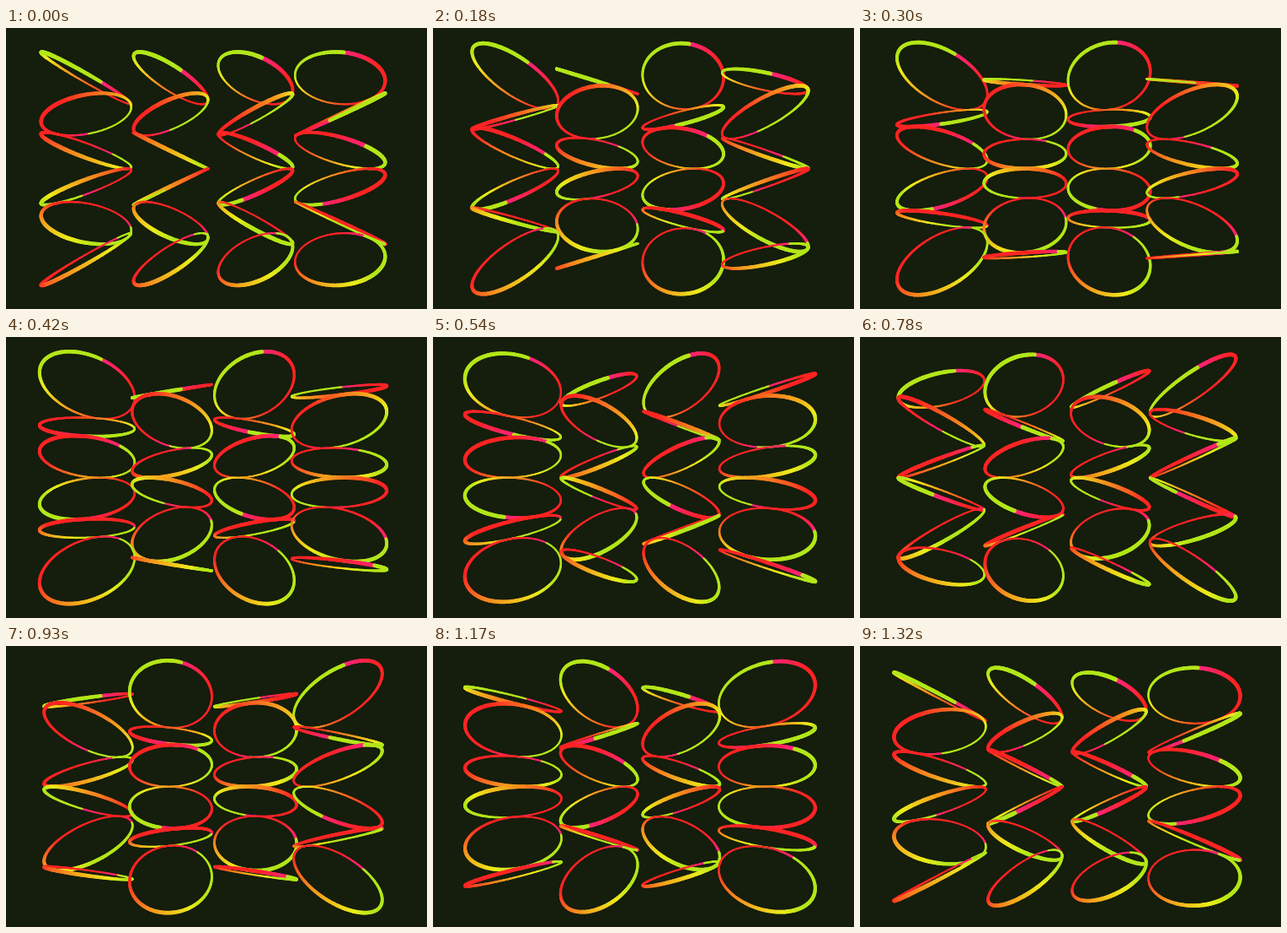
Write an HTML page with a canvas that moves like this. It is 500x333 px and loops after 1.35 s.

```html
<!DOCTYPE html>
<html lang="en">
<head>
<meta charset="utf-8">
<title>Tumbling rings</title>
<style>
html, body { margin: 0; width: 100%; height: 100%; overflow: hidden; background: #151d0c; }
canvas { display: block; width: 500px; height: 333px; }
</style>
</head>
<body>
<canvas id="stage"></canvas>
<script>
const LOOP = 1350, STEP = 30, TAU = Math.PI * 2, DEG = Math.PI / 180;
const COLS = 4, ROWS = 6, PARTS = 120;
const CX = 246, CY = 166.7, HALF_X = 48, HALF_Y = 20.5;

// Screen angle, clockwise in degrees, around which each row glows green.
const GLOW = [205, 20, 20, 180, 75, 30];
const GLOW_REACH = 75;

const canvas = document.getElementById('stage');
const ctx = canvas.getContext('2d');
const ratio = window.devicePixelRatio || 1;
canvas.width = 500 * ratio;
canvas.height = 333 * ratio;

const clamp = v => Math.max(0, Math.min(1, v));

// Magenta at the seam, a long red run, then orange and yellow up to green.
function colour(f) {
  const green = clamp((f - 0.4) / 0.36);
  const pink = clamp(1 - f / 0.12);
  const hue = 75 * green - 25 * pink;
  return `hsl(${(hue + 360) % 360}, ${100 - 20 * green}%, ${57 - 7 * green}%)`;
}

const palette = Array.from({ length: PARTS }, (_, i) => colour((i + 0.5) / PARTS));

function ring(col, row, turn) {
  const x0 = (2 * col - COLS + 1) * HALF_X;
  const y0 = (2 * row - ROWS + 1) * HALF_Y;
  const near = col % 2 ? -1 : 1;
  const high = HALF_Y * (row % 2 ? -1 : 1);

  // The flat part of the orbit wobbles twice per loop.
  const c2 = Math.cos(2 * turn), s2 = Math.sin(2 * turn);
  const wide = 44.5 - 2.5 * c2, skew = 5.5 * s2;
  const depth = near * (0.195 + 0.017 * c2);

  function point(a) {
    const s = 1 / (1 - depth * Math.cos(a));
    return {
      x: CX + s * (x0 - wide * Math.sin(a) + skew * Math.cos(a)),
      y: CY + s * (y0 - high * Math.sin(a + turn)),
      s
    };
  }

  // Phases of the swing on screen tell which way the ring runs round.
  const px = Math.atan2(wide, x0 * depth + skew);
  const py = Math.atan2(high * Math.cos(turn), y0 * depth - high * Math.sin(turn));
  const way = Math.sin(py - px) > 0 ? -1 : 1;
  const side = row < 2 ? 1 : -1;
  const first = way * (GLOW[row] + side * GLOW_REACH) * DEG - px;

  let p = point(first);
  palette.forEach((paint, i) => {
    const q = point(first + way * side * TAU * (i + 1) / PARTS);
    ctx.strokeStyle = paint;
    ctx.lineWidth = 3 * Math.pow(q.s, 2.2);
    ctx.beginPath();
    ctx.moveTo(p.x, p.y);
    ctx.lineTo(q.x, q.y);
    ctx.stroke();
    p = q;
  });
}

function draw(t) {
  ctx.setTransform(ratio, 0, 0, ratio, 0, 0);
  ctx.fillStyle = '#151d0c';
  ctx.fillRect(0, 0, 500, 333);
  ctx.lineCap = 'round';
  for (let row = 0; row < ROWS; row++)
    for (let col = 0; col < COLS; col++) ring(col, row, TAU * t / LOOP);
}

const start = performance.now();
function tick() {
  const t = (performance.now() - start) % LOOP;
  draw(Math.floor(t / STEP) * STEP);
  requestAnimationFrame(tick);
}
tick();
</script>
</body>
</html>
```
